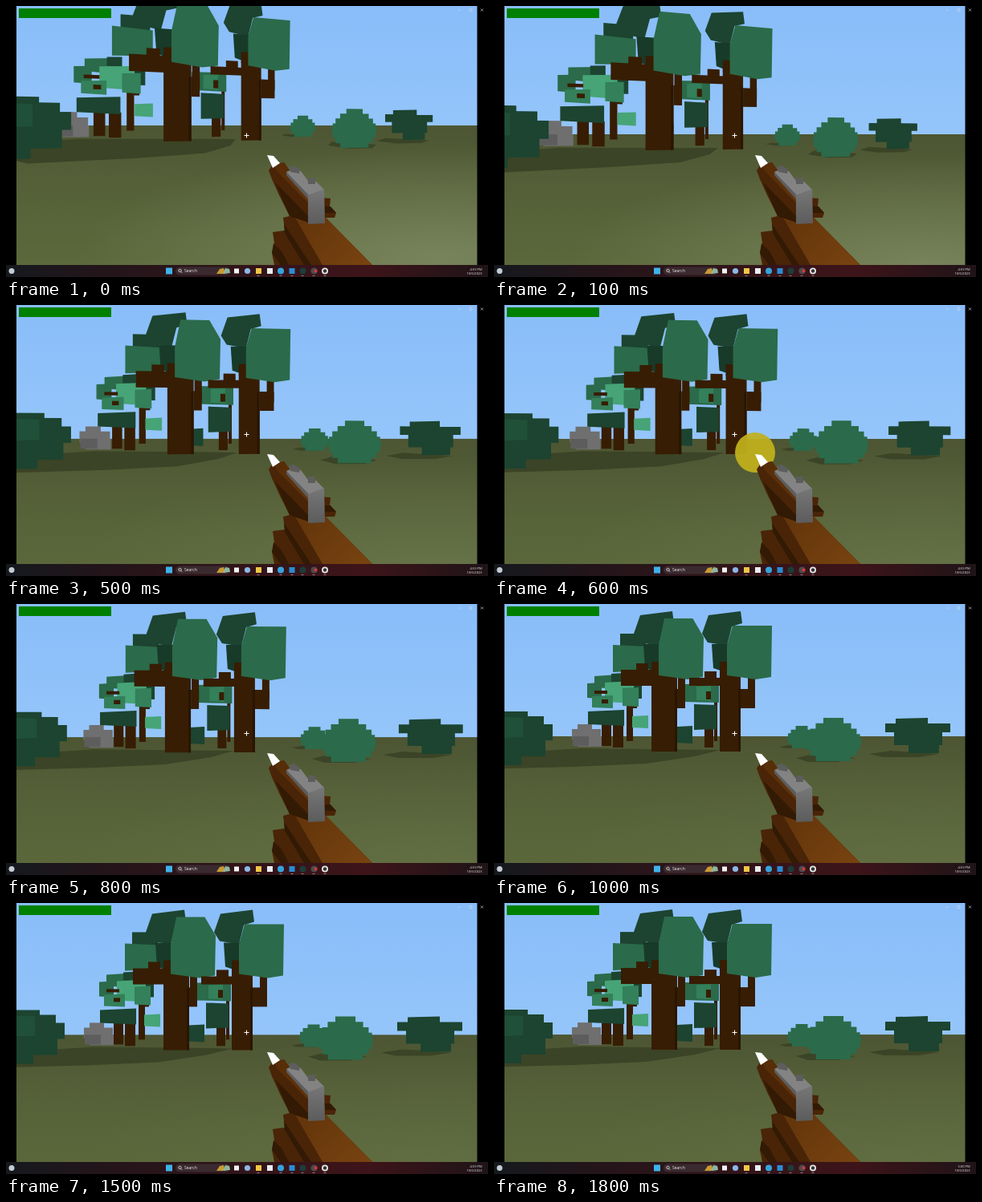
Write an HTML page that moves like this. It is 600 px wide and 338 px high and loops after 1900 ms.

```html
<!DOCTYPE html>
<html lang="en">
<head>
<meta charset="utf-8">
<title>Forest walk</title>
<style>
html, body { margin: 0; width: 100%; height: 100%; overflow: hidden; background: #000; }
svg { display: block; width: 600px; height: 338px; }
text { font-family: "Open Sans", "Noto Sans", sans-serif; fill: #eee; }
</style>
</head>
<body>
<svg viewBox="0 0 600 338">
  <defs>
    <linearGradient id="sky" x2="0" y2="1"><stop stop-color="#89bdf9"/><stop offset="1" stop-color="#96c6fa"/></linearGradient>
    <linearGradient id="ground" x2="0" y2="1"><stop stop-color="#4d5533"/><stop offset=".4" stop-color="#556038"/><stop offset="1" stop-color="#5c693b"/></linearGradient>
    <radialGradient id="glow" cx=".9" cy=".9" r=".75"><stop stop-color="#85906a" stop-opacity=".75"/><stop offset="1" stop-color="#85906a" stop-opacity="0"/></radialGradient>
    <linearGradient id="bar"><stop stop-color="#15191e"/><stop offset=".2" stop-color="#23151a"/><stop offset=".75" stop-color="#3d1419"/><stop offset="1" stop-color="#1f1418"/></linearGradient>
    <linearGradient id="wood" x2="1" y2="1"><stop stop-color="#552c08"/><stop offset="1" stop-color="#784310"/></linearGradient>
    <linearGradient id="steel" x2="0" y2="1"><stop stop-color="#777"/><stop offset="1" stop-color="#5c5c5c"/></linearGradient>
  </defs>
  <rect width="600" height="180" fill="url(#sky)"/>
  <rect id="land" width="600" height="180" fill="url(#ground)"/>
  <rect id="shine" width="600" height="180" fill="url(#glow)"/>
  <g id="world"></g>
  <circle id="flash" cx="325" cy="184" r="25" fill="#c2b11c" opacity=".93"/>

  <g id="gun">
    <path fill="#4a2407" d="M331 199L346 195 376 238 404 240 403 250 411 258 409 264 398 264 456 323 334 323 331 308 334 296 332 282 347 280 345 264 353 262 340 236 331 216 327 205Z"/>
    <path fill="url(#wood)" d="M360 264H398L456 323H394ZM333 198L346 195 376 236V245L338 207Z"/>
    <path fill="#321a04" d="M335 220L376 262V270L353 262ZM346 272L380 323H371L347 283ZM333 296L343 306 352 323H342L331 308ZM397 250H404L411 258H397Z"/>
    <path fill="#fff" d="M325 186L333 187 341 196 332 202Z"/>
    <path fill="#838383" d="M349 207L358 203 367 206 376 218 386 219 396 229 376 239Z"/>
    <path fill="url(#steel)" d="M376 236L396 228 397 271 376 272Z"/>
    <path fill="#5d5d5d" d="M349 207L376 235V241L349 211ZM376 214H385V222H376ZM352 201L358 199 366 204 365 209 354 207Z"/>
  </g>
  <path stroke="#fff" d="M296.500 161.500h6M299.500 158.500v6"/>

  <path d="M0 0h13v323H0zM586.500 0H600v323h-13.500z"/>
  <rect x="16" y="3" width="115" height="12" fill="#008000"/>
  <path stroke="#c8d8ec" stroke-width=".7" fill="none" d="M562.500 5h3M577 3.500h3v3h-3zM591 3.500l3 3m0-3l-3 3"/>

  <rect y="323" width="600" height="15" fill="url(#bar)"/>
  <rect x="211" y="325.500" width="68" height="10" rx="5" fill="#3a2a2f"/>
  <circle cx="216.500" cy="330" r="1.700" fill="none" stroke="#eee" stroke-width=".8"/>
  <path stroke="#eee" stroke-width=".8" d="M217.800 331.300l1.600 1.600"/>
  <text x="222" y="332.300" font-size="5">Search</text>
  <path fill="#c99a34" d="M262 334l4-6 5-1 2 7z"/>
  <path fill="#8fb5a0" d="M270 334l3-7 5 1 1 5z"/>
  <g id="icons"></g>
  <g font-size="4" text-anchor="end">
    <text id="clock" x="592.500" y="329.500"></text>
    <text x="592.500" y="335.300">10/6/2023</text>
  </g>
</svg>
<script>
const NS = 'http://www.w3.org/2000/svg', LOOP = 1900, STEP = 100;
const $ = id => document.getElementById(id);
const add = (parent, tag, attrs) => {
  const el = document.createElementNS(NS, tag);
  for (const k in attrs) el.setAttribute(k, attrs[k]);
  return parent.appendChild(el);
};

// The scene is laid out as seen from the resting camera, then projected from the moving one.
// Depth is given as the distance below the horizon, in pixels, at which an object meets the ground.
const FOCAL = 280, MID = 300, HORIZON = 165;
const faces = [];

function face(depth, fill, pts) {
  const world = pts.map(([x, y]) => {
    const d = depth || y - HORIZON;
    return [(x - MID) / d, (HORIZON - y) / d, FOCAL / d];
  });
  faces.push({ world, el: add($('world'), 'polygon', { fill }) });
}
const block = (depth, fill, x, y, w, h, lean = 0) =>
  face(depth, fill, [[x, y + lean], [x + w, y], [x + w, y + h], [x, y + h - lean]]);
const shadow = (x, y, w, h) =>
  face(0, SHADE, [[x, y], [x + w * .3, y - h], [x + w, y], [x + w * .7, y + h], [x + w * .2, y + h]]);

const DARK = '#1c4430', DEEP = '#183a29', LEAF = '#2b6a4a', MINT = '#33805a', FRESH = '#46a477';
const BARK = '#371d03', DUSK = '#291502', SHADE = '#3b4426', ROCK = '#6f6f6f';

// Stepped round bush
function dome(depth, x, y, w, h, rows = 8) {
  const left = [], right = [];
  for (let i = 0; i < rows; i++) {
    const half = w / 2 * Math.sin(Math.PI * (.04 + .82 * (i + .5) / rows)) ** .8;
    for (const edge of [i, i + 1]) {
      const py = y + h * edge / rows;
      left.unshift([x + w / 2 - half, py]);
      right.push([x + w / 2 + half, py]);
    }
  }
  face(depth, LEAF, [...right, ...left]);
}

// Trunk with two arms, a shaded crown behind and a lit one in front; (x, y) is the foot
function tree(depth, x, y, w, { arm, reach, back, cut }) {
  const rel = pts => pts.map(([u, v]) => [x + u, y - v]);
  const crown = (d, fill, pts) => face(d, fill, rel(pts));
  crown(depth * back, DARK, [[-22, 147], [-14, 170], [26, 175], [28, 160], [15, 156], [9, 132], [-15, 136]]);
  crown(depth, DEEP, [[-10, 134], [12, 134], [10, 98], [-8, 104]]);
  block(depth, BARK, x - 38, y - 82 - arm, 40, arm);
  block(depth, BARK, x - 19, y - 90 - arm, 15, 10);
  block(depth, BARK, x, y - 112, w * .6, 14);
  block(depth, BARK, x, y - 100, w, 100);
  block(depth, DUSK, x + w - 3, y - 78, 3, 78);
  block(depth, BARK, x + w, y - 78, reach, 24);
  block(depth, BARK, x + w + reach - 9, y - 95, 9, 30);
  crown(depth, LEAF, [[16, 157 + cut], [64 - cut * 1.4, 157 + cut], [65, 157 - cut * 1.6],
    [64, 93], [45, 90], [9, 95], [9, 132]]);
}

face(0, SHADE, [[-20, 187], [60, 183], [110, 180], [282, 182], [250, 190], [190, 199], [100, 203], [-20, 206]]);
shadow(355, 178, 40, 2);
shadow(376, 192, 74, 5);
shadow(467, 187, 88, 4);

block(11.5, ROCK, 104, 150, 18, 10);
block(11.5, ROCK, 97, 156, 36, 13);
block(11.5, ROCK, 104, 165, 30, 13);
block(11.5, '#5d5d5d', 98, 165, 20, 12);

dome(13.5, 365, 152, 36, 28, 6);
dome(25, 388, 142, 69, 54);
block(20, DARK, 498, 155, 60, 21);
block(20, DARK, 516, 172, 38, 14);
block(20, DARK, 487, 149, 81, 11);
block(20, DARK, 500, 142, 40, 10, 1);

// Grove: its right side stands nearer than its left
const grove = (fill, x, y, w, h, lean) => block(12 + (x + w / 2 - 116) / 26, fill, x, y, w, h, lean);
grove(BARK, 134, 150, 12, 27);
grove(BARK, 148, 150, 13, 29);
grove(BARK, 165, 122, 8, 49);
grove(BARK, 172, 118, 6, 12);
grove(LEAF, 116, 98, 18, 20, 1);
grove(LEAF, 125, 88, 30, 18, 2);
grove(DARK, 146, 86, 16, 12, 1);
grove(DARK, 172, 98, 12, 20);
grove(FRESH, 138, 96, 36, 28, 2);
grove(MINT, 122, 114, 26, 16, 1);
grove(MINT, 160, 104, 20, 24, 1);
grove(DARK, 117, 132, 45, 20, 2);
grove(FRESH, 172, 139, 20, 16, 1);
grove(BARK, 125, 108, 16, 4);
grove(BARK, 134, 119, 8, 5);

block(10, DARK, 228, 152, 19, 22, 1);

// Slim tree in the middle
block(14, BARK, 274, 108, 4, 63);
block(14, BARK, 262, 150, 11, 29);
block(14, LEAF, 238, 99, 42, 24, 1);
block(14, MINT, 252, 102, 18, 19, 1);
block(14, DARK, 249, 126, 28, 30, -1);
block(14, BARK, 264, 109, 6, 10);

block(14.5, DARK, 157, 37, 32, 22);
block(14.5, LEAF, 148, 53, 44, 30, -2);
tree(17, 196, 184, 32, { arm: 20, reach: 10, back: .78, cut: 9 });
tree(19.5, 281, 184, 26, { arm: 10, reach: 18, back: 1, cut: 0 });

// Bush at the left edge, widening then tapering
block(25, DARK, -40, 134, 82, 54);
block(25, DARK, -40, 140, 102, 48);
block(25, DARK, -40, 150, 113, 20);
block(25, DARK, -40, 168, 104, 22);
block(25, DARK, -40, 186, 74, 15);
block(25, '#205038', -40, 142, 76, 24, -3);

const icons = $('icons');
const dot = (cx, fill, r = 4) => add(icons, 'circle', { cx, cy: 330.5, r, fill });
const box = (x, fill, w = 7) => add(icons, 'rect', { x, y: 330.5 - w / 2, width: w, height: w, fill });
dot(7, '#c3ccd4', 3.5);
box(199, '#3fb2ea', 8);
box(284, '#f2f2f2', 6);
dot(300.5, '#8cb7e6', 3.6);
box(311, '#f0c648');
box(325, '#e9eef2');
dot(342, '#35a4dc');
box(352.5, '#2b8bd3');
dot(369.5, '#1d3c3a');
dot(383.5, '#4a4a50');
dot(385.5, '#d33a35', 2);
dot(397, '#e6e6e6'); dot(397, '#333', 2.2);
for (const x of [314, 342, 356, 369, 383, 397])
  add(icons, 'rect', { x: x - 1.5, y: 336, width: 3, height: .8, fill: '#999' });

// Camera: time, turn in radians, sideways step, height of the horizon
const path = [
  [0, .18, -3.2, 149],
  [100, .174, -2.7, 160],
  [300, .085, -1.68, 166],
  [600, .028, -.79, 167],
  [1000, 0, 0, 165],
  [1500, 0, 0, 164.4],
  [1900, 0, 0, 164]
];

// Smooth curve through the camera points that never overshoots
function camera(t, c) {
  const slope = i => (path[i + 1][c] - path[i][c]) / (path[i + 1][0] - path[i][0]);
  const tangent = i => {
    if (i === 0) return slope(0);
    if (i === path.length - 1) return slope(i - 1);
    const a = slope(i - 1), b = slope(i);
    return a * b > 0 ? 2 * a * b / (a + b) : 0;
  };
  let i = 0;
  while (t >= path[i + 1][0]) i++;
  const span = path[i + 1][0] - path[i][0], u = (t - path[i][0]) / span;
  const ease = u * u * (3 - 2 * u);
  return path[i][c] + (path[i + 1][c] - path[i][c]) * ease
    + span * u * (1 - u) * (tangent(i) * (1 - u) - tangent(i + 1) * u);
}

function draw(ms) {
  const t = Math.floor(ms % LOOP / STEP) * STEP;
  const [turn, side, horizon] = [1, 2, 3].map(c => camera(t, c));
  const cos = Math.cos(turn), sin = Math.sin(turn);
  for (const { world, el } of faces) {
    el.setAttribute('points', world.map(([x, y, z]) => {
      const k = FOCAL / (z * cos + (x - side) * sin);
      return (MID + k * ((x - side) * cos - z * sin)).toFixed(2) + ',' + (horizon - k * y).toFixed(2);
    }).join(' '));
  }
  $('land').setAttribute('y', horizon);
  $('shine').setAttribute('y', horizon);
  $('shine').setAttribute('opacity', .2 + turn * 4);
  $('flash').style.display = t === 600 ? '' : 'none';
  $('clock').textContent = t < 1700 ? '4:59 PM' : '5:00 PM';
}

const start = performance.now();
function tick() {
  draw(performance.now() - start);
  requestAnimationFrame(tick);
}
draw(0);
requestAnimationFrame(tick);
</script>
</body>
</html>
```
